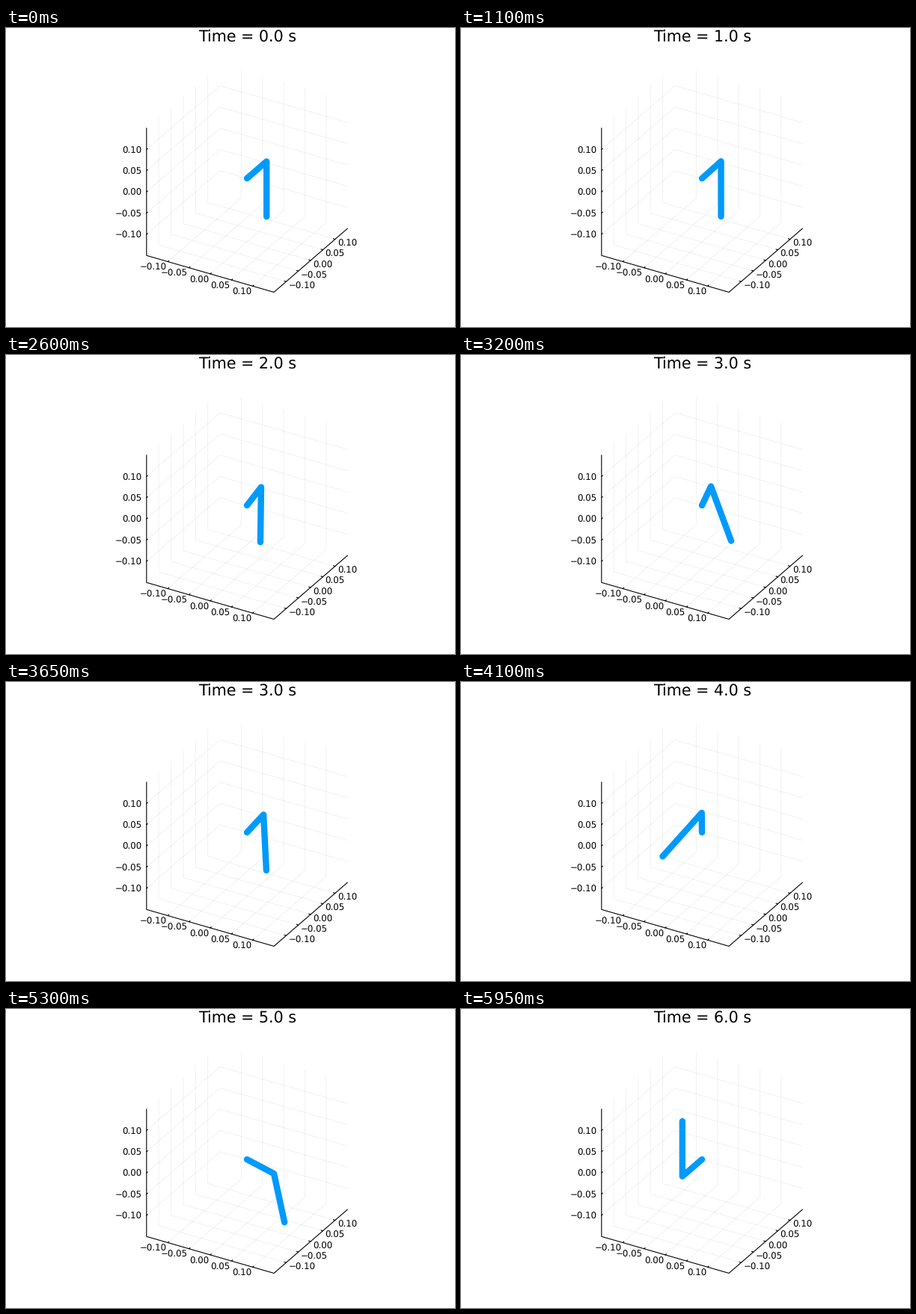
Recreate the animation shown at these times as a matplotlib script. Size 600 by 400 pixels, loop 6 s.

```python
import numpy as np
import matplotlib.pyplot as plt
from matplotlib.animation import FuncAnimation

plt.rcParams["font.family"] = "DejaVu Sans"
plt.rcParams["text.hinting"] = "none"

W, H, DPI = 600, 400, 100
FRAMES, STEP = 120, 50
LIM = 0.15
ARM, ROD = 0.08, 0.13
TICKS = np.linspace(-0.1, 0.1, 5)
PT = 72 / DPI

# screen offset of one data unit along x, y and z
CENTRE = np.array([322.0, 201.2])
BASIS = np.array([[170.2, 49.1], [98.2, -85.1], [0.0, -170.3]]) / (2 * LIM)

# turning points (ms, degrees) of the rod's swing and the arm's turn
SWING = [(0, 0), (1330, 0), (1690, -1), (2050, 3), (2450, -7), (2780, 11),
         (3112, -28), (3475, 37), (3845, -50), (4213, 62), (4645, -72.5),
         (5080, 95), (5950, -180)]
TURN = [(0, 0), (1500, 1), (1870, 3.4), (2230, 2), (2610, 8.8), (2935, -1.5),
        (3290, 20), (3660, 5), (4055, 31), (4500, 3.8), (4730, 9.8),
        (5950, -180)]


def sway(points, t, settle):
    """Cosine ease between turning points; the last one slows down more."""
    x, y = np.array(points, float).T
    i = min(np.searchsorted(x, t, side="right"), len(x) - 1) - 1
    s = (t - x[i]) / (x[i + 1] - x[i])
    if i == len(x) - 2:
        s = 1 - (1 - s) ** settle
    ease = (1 - np.cos(np.pi * s)) / 2
    return np.radians(y[i] + (y[i + 1] - y[i]) * ease)


def project(*points):
    return CENTRE + np.array(points, float) @ BASIS


fig = plt.figure(figsize=(W / DPI, H / DPI), dpi=DPI, facecolor="white")
ax = fig.add_axes([0, 0, 1, 1])
ax.set_xlim(0, W)
ax.set_ylim(H, 0)
ax.axis("off")


def path(*points, **style):
    return ax.plot(*project(*points).T, **style)[0]


def label(value, point, dx, dy, ha):
    x, y = project(point)[0]
    text = f"{value:.2f}".replace("-", "\u2212")
    ax.text(x + dx, y + dy, text, fontsize=8.5, ha=ha, va="baseline")


grid = dict(color="black", alpha=0.055, lw=PT, zorder=1)
edge = dict(color="black", lw=PT * 1.1, zorder=2)
INSET = 0.004

for v in TICKS:
    path((v, -LIM, -LIM), (v, LIM, -LIM), (v, LIM, LIM), **grid)
    path((LIM, v, -LIM), (-LIM, v, -LIM), (-LIM, v, LIM), **grid)
    path((-LIM, -LIM, v), (-LIM, LIM, v), (LIM, LIM, v), **grid)

    path((v, -LIM, -LIM), (v, INSET - LIM, -LIM), **edge)
    path((LIM, v, -LIM), (LIM - INSET, v, -LIM), **edge)
    path((-LIM, -LIM, v), (-LIM, INSET - LIM, v), **edge)

    label(v, (v, -LIM, -LIM), -1.5, 11.5, "right")
    label(v, (LIM, v, -LIM), 3.2, 9.5, "left")
    label(v, (-LIM, -LIM, v), -6, 5, "right")

path((-LIM, -LIM, LIM), (-LIM, -LIM, -LIM), (LIM, -LIM, -LIM),
     (LIM, LIM, -LIM), **edge)

title = ax.text(322.7, 18.5, "", fontsize=14.9, ha="center", va="baseline")
links, = ax.plot([], [], color="#009AFA", lw=8.4 * PT, zorder=3,
                 solid_capstyle="round", solid_joinstyle="round")


def draw(i):
    swing = sway(SWING, i * STEP, 1.57)
    turn = sway(TURN, i * STEP, 1.35)
    outward = np.array([-np.sin(turn), np.cos(turn), 0])
    along = np.array([-np.cos(turn), -np.sin(turn), 0])
    down = np.array([0, 0, -1])
    elbow = ARM * outward
    tip = elbow + ROD * (np.sin(swing) * along + np.cos(swing) * down)
    links.set_data(*project((0, 0, 0), elbow, tip).T)
    title.set_text(f"Time = {(i + 1) * STEP // 1000:.1f} s")
    return links, title


anim = FuncAnimation(fig, draw, frames=FRAMES, interval=STEP,
                     init_func=lambda: draw(0), repeat=True, repeat_delay=0)
plt.show()
```
